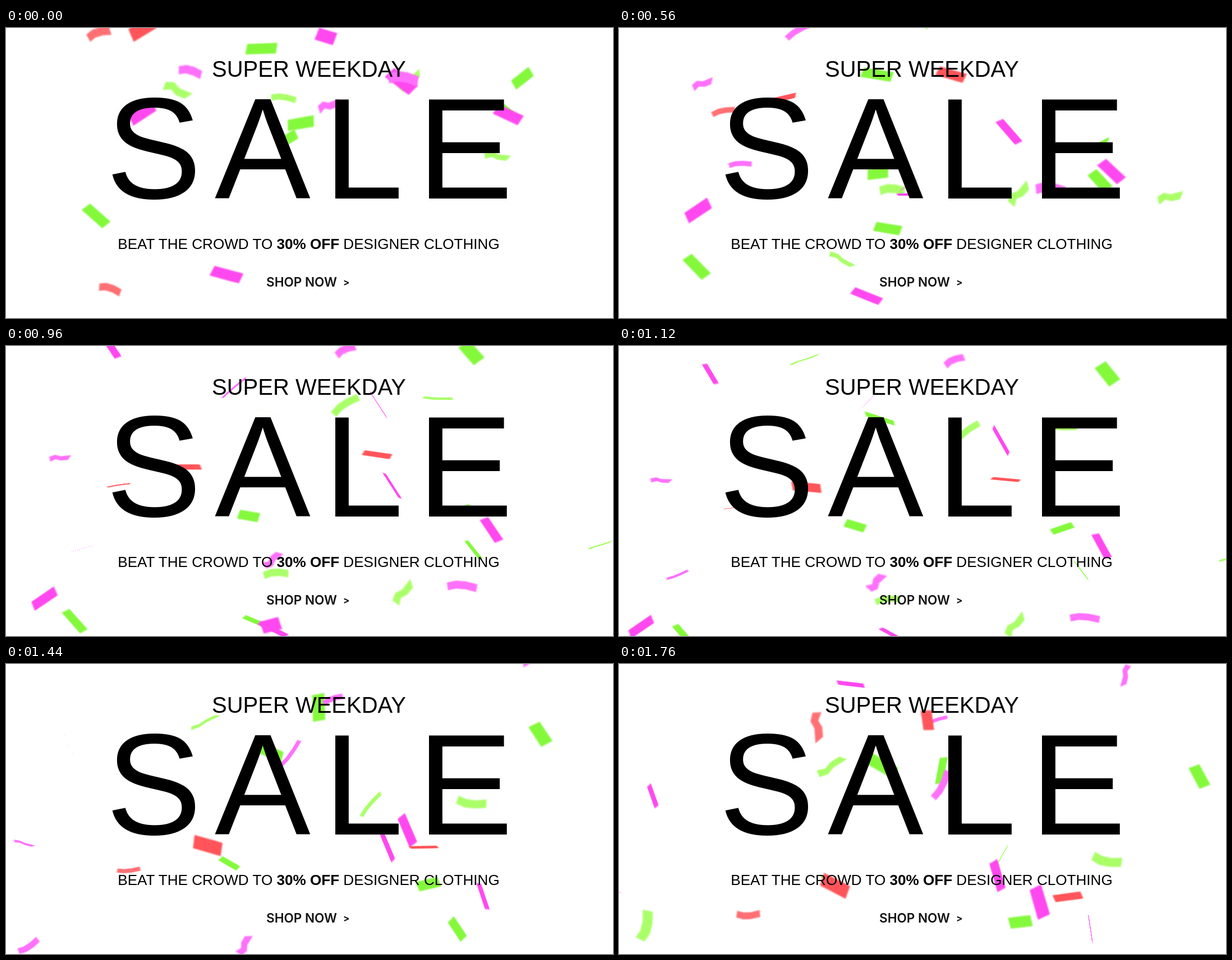
An HTML page that plays this animation: 1082x517 px, repeating every 1.84 s.

```html
<!DOCTYPE html>
<html lang="en">
<head>
<meta charset="utf-8">
<title>Sale banner</title>
<style>
  html, body { margin: 0; width: 100%; height: 100%; overflow: hidden; background: #fff; }
  #stage { position: relative; width: 1082px; height: 517px; overflow: hidden; }
  svg { position: absolute; inset: 0; }
  text { font-family: "Liberation Sans", Arial, sans-serif; fill: #000; }
  .button { font-family: Inter, sans-serif; font-weight: 600; font-size: 22.5px; fill: #111; }
  .piece {
    position: absolute;
    left: calc(var(--w) / -2);
    top: calc(var(--h) / -2);
    width: var(--w);
    height: var(--h);
    filter: blur(.8px);
    animation: fall 1840ms steps(23) infinite;
  }
  .piece i { display: block; width: 100%; height: 100%; background: var(--color); }
  .bent i { clip-path: polygon(0 18%, 30% 0, 62% 6%, 100% 30%, 96% 100%, 62% 76%, 30% 70%, 4% 86%); }
  .slant i { clip-path: polygon(8% 0, 100% 6%, 93% 100%, 0 92%); }
  .wave i { clip-path: polygon(0 34%, 26% 4%, 52% 20%, 100% 0, 86% 66%, 54% 78%, 30% 62%, 6% 100%); }
  @keyframes fall {
    from { transform: translate(var(--from)) rotate(var(--turn0)) rotateX(var(--tilt0)); }
    to { transform: translate(var(--to)) rotate(var(--turn1)) rotateX(var(--tilt1)); }
  }
</style>
</head>
<body>
<div id="stage">
  <div id="confetti"></div>
  <svg width="1082" height="517" viewBox="0 0 1082 517">
    <text x="540" y="86.5" font-size="40" text-anchor="middle">SUPER WEEKDAY</text>
    <text x="178 372 566 733" y="304" font-size="256">SALE</text>
    <text x="539.5" y="393.5" font-size="26.1" text-anchor="middle">BEAT THE CROWD TO <tspan font-weight="700">30% OFF</tspan> DESIGNER CLOTHING</text>
    <text class="button" x="464" y="460.5">SHOP NOW<tspan x="601" dy="-2" font-size="17" font-weight="700">&gt;</tspan></text>
  </svg>
</div>
<script>
  // Each drift: x, y at the first step, then x, y at the last step.
  const drifts = {
    green: [
      [920, 90, 715, 460], [650, -215, 870, 350], [583, -215, 1034, 200],
      [250, -250, 378, 181], [480, -430, 575, 190], [515, -185, 680, 347],
      [455, 37, 470, 182], [722, 95, 700, 728], [890, 145, 785, 545],
      [495, 125, 470, 640], [525, 170, 379, 760], [305, 113, 595, 1060],
      [160, 335, 90, 620], [-360, -200, 47, 466], [502, 198, 375, 390],
      [875, 230, 1213, 459]
    ],
    pink: [
      [705, 95, 675, 377], [650, -103, 568, 100], [895, 155, 840, 472],
      [575, 140, 390, 580], [570, 15, 390, 900], [328, 78, -24, 597],
      [242, 150, -77, 700], [225, -40, -10, 400], [560, -280, 750, 424],
      [205, -95, 575, 215], [342, -275, 60, 235], [1050, -180, 903, 21],
      [393, 440, 545, 560], [708, 90, 900, 710], [850, -360, 413, 36]
    ],
    red: [
      [495, -72, 800, 415], [165, 10, 230, 447], [245, 0, 385, 395],
      [-90, -700, 355, 112], [590, -760, 550, 100], [185, 465, 100, 1000]
    ]
  };
  const tints = {
    green: ['#84f93c', '#aaff69'],
    pink: ['#ff48ef', '#ff70fb'],
    red: ['#ff555a', '#ff7074']
  };
  const shapes = ['slant', 'bent', 'slant', 'wave'];
  const confetti = document.getElementById('confetti');

  let seed = 7;
  const random = (low, high) => {
    seed = (seed * 16807) % 2147483647;
    return low + (high - low) * seed / 2147483647;
  };
  const px = (x, y) => `${x}px, ${y}px`;

  function addPiece(tint, [x0, y0, x1, y1], index) {
    const piece = document.createElement('div');
    const turn = random(-40, 45);
    const tilt = random(-60, 30);
    const reach = 23 / 22; // the loop closes one step after the last position
    const style = {
      w: random(36, 60) + 'px',
      h: random(20, 27) + 'px',
      color: tints[tint][index % 2],
      from: px(x0, y0),
      to: px(x0 + (x1 - x0) * reach, y0 + (y1 - y0) * reach),
      turn0: turn + 'deg',
      turn1: turn + random(-80, 80) + 'deg',
      tilt0: tilt + 'deg',
      tilt1: tilt + random(60, 260) + 'deg'
    };
    piece.className = 'piece ' + shapes[index % shapes.length];
    for (const name in style) piece.style.setProperty('--' + name, style[name]);
    piece.append(document.createElement('i'));
    confetti.append(piece);
  }

  for (const tint in drifts) {
    drifts[tint].forEach((drift, index) => addPiece(tint, drift, index));
  }
</script>
</body>
</html>
```
